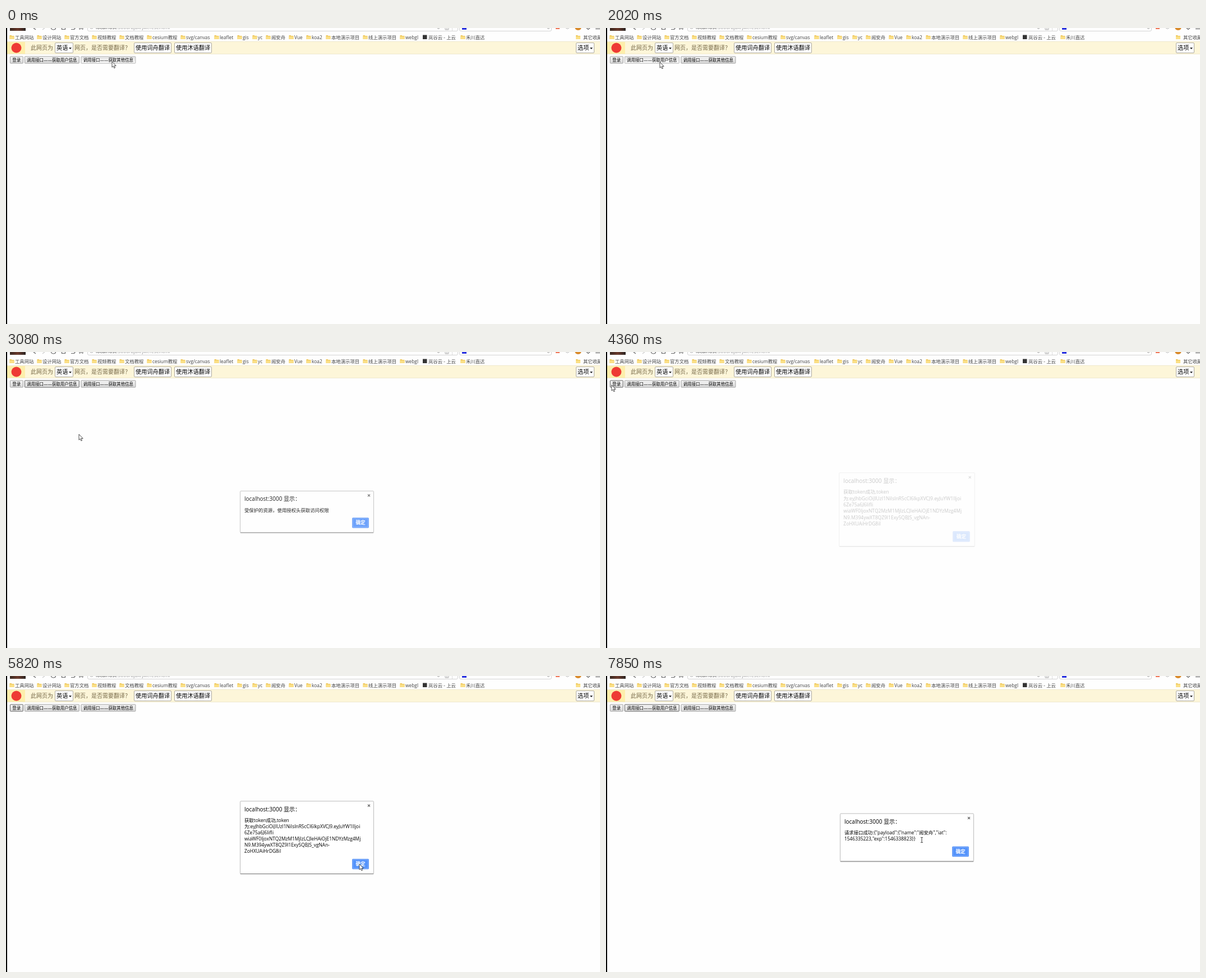
Animation of 1059x529 px, one loop 8000 ms. Source, as an HTML page:

```html
<!DOCTYPE html>
<html>
<head>
<meta charset="utf-8">
<title>Token login demo</title>
<style>
html, body { margin: 0; width: 100%; height: 100%; overflow: hidden; background: #fefefe; }
svg { display: block; width: 100vw; height: 100vh; }
text { font-family: "Open Sans", "Noto Sans CJK SC", "Noto Sans CJK", sans-serif; white-space: pre; }
.dialog text { font-weight: 500; }
</style>
</head>
<body>
<svg id="stage" viewBox="0 0 1059 529" preserveAspectRatio="none">
  <defs>
    <linearGradient id="up" x2="0" y2="1"><stop stop-color="#f5f5f5"/><stop offset="1" stop-color="#d9d9d9"/></linearGradient>
    <linearGradient id="down" x2="0" y2="1"><stop stop-color="#e2e2e2"/><stop offset="1" stop-color="#fafafa"/></linearGradient>
    <linearGradient id="photo"><stop stop-color="#3a2a22"/><stop offset=".5" stop-color="#6b3a2c"/><stop offset="1" stop-color="#2a2522"/></linearGradient>
  </defs>
</svg>
<script>
const LOOP = 8000;
const NS = 'http://www.w3.org/2000/svg';
const stage = document.getElementById('stage');

function add(parent, tag, attrs, content) {
  const node = document.createElementNS(NS, tag);
  for (const key in attrs) node.setAttribute(key, attrs[key]);
  if (content) node.textContent = content;
  parent.append(node);
  return node;
}
const rect = (g, x, y, width, height, fill, more) => add(g, 'rect', { x, y, width, height, fill, ...more });
const label = (g, x, y, size, fill, str) => add(g, 'text', { x, y, 'font-size': size, fill }, str);
const line = (g, d, stroke, width = 1) => add(g, 'path', { d, stroke, fill: 'none', 'stroke-width': width });
const fillPath = (g, d, fill) => add(g, 'path', { d, fill });

// Browser toolbar, cut off by the top edge
function drawToolbar() {
  rect(stage, 7, 0, 28, 5, 'url(#photo)');
  line(stage, 'M49 0l4 3', '#666', 1.2);
  line(stage, 'M69 0l-4 3', '#ccc', 1.2);
  line(stage, 'M80.5 0a4 3 0 0 0 8 0', '#666', 1.2);
  line(stage, 'M99.5 0v2.5h6v-2.5', '#666', 1.2);
  line(stage, 'M116 2.5h4q3 0 3-2.5', '#666', 1.2);
  line(stage, 'M131 0v2.5l3-2l3 2v-2.5', '#666');
  line(stage, 'M145.5 0v3q0 2.5 2.5 2.5H803q2.5 0 2.5-2.5V0', '#d4d4d4');
  line(stage, 'M150 0a3 2.5 0 0 0 5 0', '#aaa');
  const url = label(stage, 160, 2, 8.8, '#444', 'localhost');
  add(url, 'tspan', { fill: '#999' }, ':3000/ajax/jwtTest.html');
  line(stage, 'M769 0l2 1.5l2-1.5M965 0l2 1.5l2-1.5', '#999');
  line(stage, 'M783 0v3h6v-3M786 0v3', '#aaa');
  line(stage, 'M795.5 0v5', '#ddd');
  line(stage, 'M808.5 0v3q0 2.5 2.5 2.5H970q2.5 0 2.5-2.5V0', '#d4d4d4');
  rect(stage, 813, 0, 8, 3, '#2a32e0');
  rect(stage, 980, 0, 7, 2, '#f0785a');
  line(stage, 'M998 0l3 1.5l3-1.5', '#bbb');
  fillPath(stage, 'M1014.5 0h11a5.5 4 0 0 1-11 0z', '#d98a2b');
  line(stage, 'M1035 0l3 2.5l3-2.5', '#666', 1.2);
  line(stage, 'M1051 1.5h8', '#666', 1.2);
}

function folder(x) {
  fillPath(stage, `M${x} 13h3l1 1h4v6h-8z`, '#eec75c');
  rect(stage, x, 15, 8, 5, '#fadf86');
}

function drawBookmarks() {
  const marks = {
    16: '工具网站', 65: '设计网站', 114: '官方文档', 163: '视频教程', 212: '文档教程',
    261: 'cesium教程', 321: 'svg/canvas', 381: 'leaflet', 422: 'gis', 449: 'yc',
    473: '闻安舟', 514: 'Vue', 545: 'koa2', 580: '本地演示项目', 646: '线上演示项目',
    712: 'webgl', 753: '岚谷云 - 上云', 820: '禾川直达', 1029: '其它收藏夹'
  };
  for (const x in marks) {
    if (x == 753) rect(stage, 743, 12.5, 7.5, 7.5, '#333');
    else folder(x == 1029 ? 1016 : x - 9.5);
    label(stage, x, 19.6, 8.4, '#444', marks[x]);
  }
}

function barButton(x, width, str, arrow) {
  rect(stage, x + .5, 26.5, width - 1, 18, '#fff', { stroke: '#aeaa9f', rx: 1.5 });
  label(stage, x + 3, 39.2, 10.2, '#000', str);
  if (arrow) fillPath(stage, `M${x + width - 8} 35h5l-2.5 3z`, '#222');
}

function drawTranslateBar() {
  rect(stage, 2, 24, 1057, 22.5, '#fdf6d9');
  line(stage, 'M2 24.2H1059M2 46.5H1059', '#ece5c8', .8);
  rect(stage, 2, 25, 32, 21, '#fdeeab');
  add(stage, 'circle', { cx: 18.5, cy: 35.5, r: 9, fill: '#ee3a34' });
  label(stage, 44, 39.2, 10, '#776a48', '此网页为');
  barButton(87, 33, '英语', true);
  label(stage, 122, 39.2, 10, '#776a48', '网页，是否需要翻译？');
  barButton(228, 67, '使用词舟翻译');
  barButton(300, 67, '使用沐语翻译');
  barButton(1016, 33, '选项', true);
}

function pageButton(x, width, str) {
  const box = rect(stage, x + .4, 50.9, width - 1, 12.2, 'url(#up)', { rx: .8 });
  label(stage, x + 4.3, 59.9, 7.45, '#000', str);
  return box;
}

function makeDialog(lines) {
  const height = 63 + lines.length * 11.1;
  const top = 288.5 - height / 2, bottom = top + height;
  const g = add(stage, 'g', { class: 'dialog', visibility: 'hidden' });
  rect(g, 417, top + 1, 239, height + 1, '#000', { opacity: .1, rx: 2 });
  rect(g, 417.5, top, 238, height, '#fff', { stroke: '#bcbcbc', rx: 1.5 });
  line(g, `M418 ${bottom + .2}H655`, '#8c8c8c');
  label(g, 425, top + 18, 10, '#000', 'localhost:3000 显示：');
  line(g, `M645 ${top + 6}l4 4m0-4l-4 4`, '#555', 1.1);
  lines.forEach((str, i) => label(g, 425, top + 37.2 + i * 11.1, 8.4, '#000', str));
  rect(g, 617.5, bottom - 26, 29, 17.5, '#5493fb', { stroke: '#5b95f5', rx: 1 });
  rect(g, 618.7, bottom - 24.8, 26.6, 15.1, 'none', { stroke: '#8db6ff', 'stroke-width': .7 });
  label(g, 623.5, bottom - 14.2, 8.6, '#fff', '确定').style.fontWeight = 700;
  return { g, top, bottom };
}

drawToolbar();
drawBookmarks();
drawTranslateBar();
const buttons = [
  pageButton(7, 24, '登录'),
  pageButton(33, 98, '调用接口——获取用户信息'),
  pageButton(133.5, 98, '调用接口——获取其他信息')
];
rect(stage, 0, 0, 2, 529, '#000');

const denied = makeDialog(['受保护的资源，使用授权头获取访问权限']);
const token = makeDialog([
  '获取token成功,token',
  '为:eyJhbGciOiJIUzI1NiIsInR5cCI6IkpXVCJ9.eyJuYW1lIjoi',
  '6Ze75a6J6IifIi',
  'wiaWF0IjoxNTQ2MzM1MjIzLCJleHAiOjE1NDYzMzg4Mj',
  'N9.M394ywXT8QZ9l1Exy5QBJS_vgNAn-',
  'ZoHXUAiHrDG8iI'
]);
const payload = makeDialog([
  '请求接口成功:{"payload":{"name":"闻安舟","iat":',
  '1546335223,"exp":1546338823}}'
]);

const arrow = add(stage, 'path', {
  d: 'M0 0V10.2L2.3 8.1L3.9 11.8L5.6 11L4 7.5H7.2Z',
  fill: '#fff', stroke: '#222', 'stroke-width': .8
});
const beam = add(stage, 'g', {});
const beamPath = 'M-2 -4.5h1.5l.5 .5l.5-.5h1.5M0 -4V4M-2 4.5h1.5l.5-.5l.5 .5h1.5';
line(beam, beamPath, '#fff', 2.2);
line(beam, beamPath, '#222', .9);

// [first step, last step, steps, x, y]
const moves = [
  [490, 830, 3, 625, 304], [1290, 2020, 6, 96, 61],
  [2550, 2820, 3, 632, 306], [2950, 3080, 2, 130, 147],
  [3230, 3230, 1, 109, 130], [3360, 3780, 4, 10, 59],
  [4630, 5280, 6, 504, 301], [5400, 5400, 1, 504, 302],
  [5660, 5800, 2, 630, 336], [5930, 6340, 4, 107, 57],
  [7100, 7450, 4, 503, 286], [7580, 7850, 3, 563, 293]
];
// [time, focused button, pressed]
const presses = [
  [0, 2, 1], [150, 2, 0], [2020, 1, 1], [2170, 1, 0],
  [4240, 0, 1], [4360, 0, 0], [6480, 1, 1], [6720, 1, 0]
];
// [dialog, faint, open, fading, gone]
const shows = [
  [denied, 150, 320, 1140, 1290], [denied, 2290, 2420, 3080, 3230],
  [token, 4360, 4500, 5930, 6070], [payload, 6850, 6980, LOOP, LOOP]
];

function cursorAt(t) {
  let x = 189, y = 60;
  for (const [start, end, n, toX, toY] of moves) {
    if (t < start) break;
    const gap = (end - start) / (n - 1 || 1) || 1;
    const k = Math.min(n, 1 + Math.floor((t - start) / gap + 1e-6));
    const ease = 1 - (1 - k / n) ** 2;
    x += (toX - x) * ease;
    y += (toY - y) * ease;
  }
  return [x, y];
}

function render(t) {
  const [, focus, pressed] = presses.findLast(p => p[0] <= t);
  buttons.forEach((box, i) => {
    const held = i === focus && pressed;
    box.setAttribute('fill', held ? 'url(#down)' : 'url(#up)');
    box.setAttribute('stroke', held ? '#b4b4b4' : i === focus ? '#626262' : '#a2a2a2');
  });

  for (const d of [denied, token, payload]) d.g.setAttribute('visibility', 'hidden');
  const show = shows.find(s => t >= s[1] && t < s[4]);
  const [x, y] = cursorAt(t);
  let overText = false;
  if (show) {
    const [d, , open, fading] = show;
    const [alpha, shift, scale] = t < open ? [.2, -7, 1.015] : t < fading ? [1, 0, 1] : [.85, -3, 1];
    d.g.setAttribute('visibility', 'visible');
    d.g.setAttribute('opacity', alpha);
    d.g.setAttribute('transform', `translate(536.5 ${288.5 + shift}) scale(${scale}) translate(-536.5 -288.5)`);
    overText = x > 425 && x < 610 && y > d.top + 28 && y < d.bottom - 28;
  }

  const place = `translate(${x} ${y})`;
  arrow.setAttribute('transform', place);
  beam.setAttribute('transform', place);
  arrow.setAttribute('visibility', overText ? 'hidden' : 'visible');
  beam.setAttribute('visibility', overText ? 'visible' : 'hidden');
}

const begin = performance.now();
function tick() {
  render((performance.now() - begin) % LOOP);
  requestAnimationFrame(tick);
}
tick();
</script>
</body>
</html>
```
